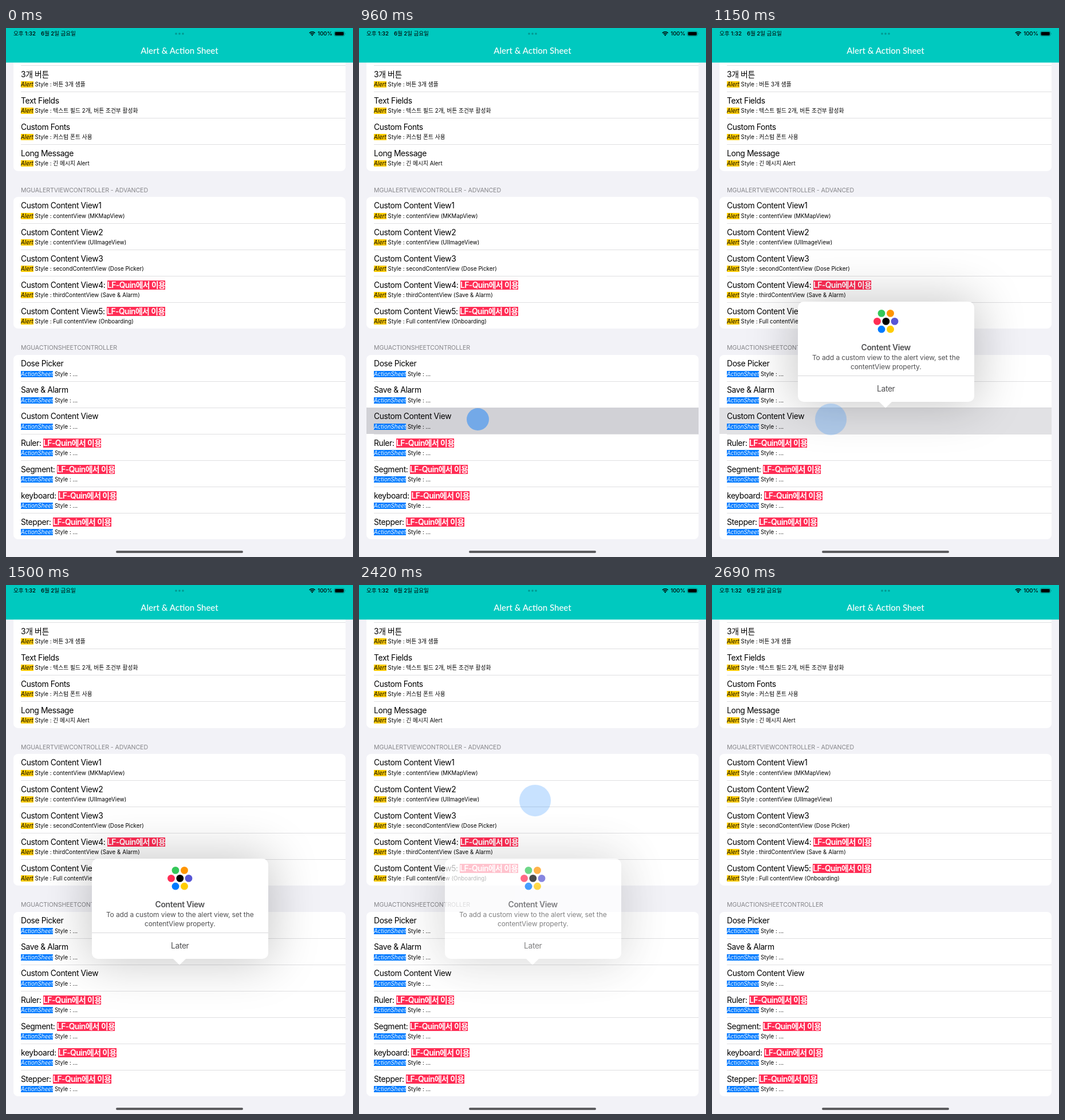
An HTML page that plays this animation: 606 by 924 pixels, repeating every 2.88 s.

```html
<!DOCTYPE html>
<html lang="ko">
<head>
<meta charset="utf-8">
<title>Alert &amp; Action Sheet</title>
<style>
  html, body { margin: 0; width: 100%; height: 100%; overflow: hidden; }
  body {
    position: relative;
    background: #f2f2f7;
    color: #000;
    font-family: Inter, "Noto Sans CJK KR", "Noto Sans CJK", sans-serif;
    white-space: nowrap;
  }
  .abs, .card, .row::after, .tap, .popup, .popup > * { position: absolute; }

  /* navigation bar */
  .nav { left: 0; top: 0; width: 100%; height: 60px; background: #00c9bf; box-shadow: 0 1px #00c9bf66; }
  .status { top: 3px; font-size: 9.6px; line-height: 14px; font-weight: 500; letter-spacing: -.04px; }
  .heading {
    left: 0; right: 0; top: 29px; text-align: center; color: #fff;
    font: 500 15px/20px Lato, sans-serif;
  }
  .nav svg { position: absolute; left: 0; top: 0; }

  /* list */
  .card { left: 13px; width: 580px; background: #fff; border-radius: 8px; overflow: hidden; }
  .row { position: relative; height: 46.05px; padding-left: 13px; }
  .row::after { content: ""; left: 13px; right: 0; bottom: -.5px; height: 1px; background: #dfdfe1; }
  .row:last-child::after { display: none; }
  .name { padding-top: 5.3px; font-size: 13.85px; line-height: 20px; letter-spacing: -.36px; }
  .sub { margin-top: 1.4px; font-size: 9.7px; line-height: 14px; letter-spacing: .05px; }
  .badge { background: #ff2d55; color: #fff; font-weight: 600; letter-spacing: -.57px; }
  .kind { font-style: italic; }
  .alert { background: #fc0; }
  .sheet { background: #007aff; color: #fff; }
  .section { left: 26px; font-size: 10.6px; line-height: 14px; letter-spacing: -.1px; color: #858589; }
  .home { left: 192px; top: 913.4px; width: 222px; height: 4.1px; border-radius: 3px; background: #5b5b5e; }

  /* popover */
  .popup {
    left: 150px; top: 478px; width: 307.5px; height: 174.7px;
    border-radius: 10px; background: #fff; color: #505052;
    box-shadow: 0 0 84px 6px rgba(0, 0, 0, .22);
    text-align: center;
    opacity: 0;
    animation: popup 2880ms linear infinite;
  }
  .popup > div { left: 0; right: 0; }
  .popup .arrow {
    left: 141px; right: auto; top: 174px; width: 24px; height: 11.5px; background: #fff;
    clip-path: polygon(0 0, 100% 0, 55% 92%, 50% 100%, 45% 92%);
  }
  .popup .head { top: 70px; font-size: 13.85px; line-height: 20px; font-weight: 600; letter-spacing: -.32px; }
  .popup .note { top: 89.5px; font-size: 12px; line-height: 16.4px; letter-spacing: -.1px; }
  .popup .line { top: 128.5px; height: 1px; background: #d8d8da; }
  .popup .later { top: 142px; font-size: 13.85px; line-height: 20px; letter-spacing: -.4px; }
  .popup svg { left: 0; top: 0; }

  /* touches */
  .tap {
    width: 39px; height: 39px; margin: -19.5px; border-radius: 50%;
    background: #007aff; opacity: 0;
    animation: tap 2880ms linear infinite;
  }
  .pressed { animation: press 2880ms linear infinite; }

  @keyframes tap {
    0%, 2.083% { opacity: .45; transform: scale(1); }
    13.889%, 100% { opacity: 0; transform: scale(1.8); }
  }
  @keyframes press {
    0%, 33.1% { background-color: #d1d1d600; }
    33.101%, 34.9% { background-color: #d1d1d6; }
    49.3%, 100% { background-color: #d1d1d600; }
  }
  @keyframes popup {
    0%, 34.4% { opacity: 0; }
    34.401% { opacity: 1; }
    78.819% { opacity: 1; animation-timing-function: ease-in-out; }
    93.056%, 100% { opacity: 0; }
  }
</style>
</head>
<body>
  <div id="list"></div>
  <div class="abs section" style="top:276.5px">MGUALERTVIEWCONTROLLER - ADVANCED</div>
  <div class="abs section" style="top:552px">MGUACTIONSHEETCONTROLLER</div>

  <div class="abs nav">
    <div class="abs status" style="left:13px">오후 1:32</div>
    <div class="abs status" style="left:61px">6월 2일 금요일</div>
    <div class="abs status" style="right:36px">100%</div>
    <div class="abs heading">Alert &amp; Action Sheet</div>
    <svg width="606" height="60" fill="none">
      <g fill="#00978f">
        <circle cx="297" cy="10" r="1.8"/><circle cx="303" cy="10" r="1.8"/><circle cx="309" cy="10" r="1.8"/>
      </g>
      <g stroke="#000" stroke-width="1.5">
        <path d="M529.8 8.7a7 7 0 0 1 9.9 0M531.7 10.7a4.3 4.3 0 0 1 6.1 0"/>
      </g>
      <path d="M533 12a2.5 2.5 0 0 1 3.5 0l-1.75 1.9z" fill="#000"/>
      <rect x="573.4" y="5.9" width="17.6" height="8.2" rx="2.5" stroke="#00756f" stroke-width=".8"/>
      <rect x="574.6" y="7.1" width="15.2" height="5.8" rx="1.4" fill="#000"/>
      <path d="M592 8.7q1.2 1.3 0 2.6z" fill="#00756f"/>
    </svg>
  </div>

  <div class="abs home"></div>

  <div class="popup">
    <svg width="307" height="70" id="dots"></svg>
    <div class="head">Content View</div>
    <div class="note">To add a custom view to the alert view, set the<br>contentView property.</div>
    <div class="line"></div>
    <div class="later">Later</div>
    <div class="arrow"></div>
  </div>

  <div class="tap" style="left:207.5px;top:683.5px;animation-delay:915ms"></div>
  <div class="tap" style="left:307.5px;top:376.5px;animation-delay:2185ms"></div>

<script>
  const BADGE = '<span class="badge">LF-Quin에서 이용</span>';
  const alertKind = '<span class="kind alert">Alert</span>';
  const sheetKind = '<span class="kind sheet">ActionSheet</span>';

  const cards = [
    { top: 19.3, kind: alertKind, rows: [
      ['', ''],
      ['3개 버튼', '버튼 3개 샘플'],
      ['Text Fields', '텍스트 필드 2개, 버튼 조건부 활성화'],
      ['Custom Fonts', '커스텀 폰트 사용'],
      ['Long Message', '긴 메시지 Alert'],
    ] },
    { top: 295.2, kind: alertKind, rows: [
      ['Custom Content View1', 'contentView (MKMapView)'],
      ['Custom Content View2', 'contentView (UIImageView)'],
      ['Custom Content View3', 'secondContentView (Dose Picker)'],
      ['Custom Content View4: ' + BADGE, 'thirdContentView (Save &amp; Alarm)'],
      ['Custom Content View5: ' + BADGE, 'Full contentView (Onboarding)'],
    ] },
    { top: 571.1, kind: sheetKind, pressed: 2, rows: [
      'Dose Picker', 'Save &amp; Alarm', 'Custom Content View',
      'Ruler: ' + BADGE, 'Segment: ' + BADGE, 'keyboard: ' + BADGE, 'Stepper: ' + BADGE,
    ].map(name => [name, '...']) },
  ];

  const rowHtml = (kind, [name, text], pressed) =>
    `<div class="row${pressed ? ' pressed' : ''}">` +
    `<div class="name">${name}</div><div class="sub">${text && `${kind} Style : ${text}`}</div></div>`;

  document.getElementById('list').innerHTML = cards.map(({ top, kind, rows, pressed }) =>
    `<div class="card" style="top:${top}px">` +
    rows.map((row, i) => rowHtml(kind, row, i === pressed)).join('') + '</div>').join('');

  const dots = [
    [146, 20.4, '#34c759'], [161.5, 20.4, '#ff9500'],
    [138.5, 34.4, '#ff2d55'], [153.8, 34.4, '#000'], [169, 34.4, '#5856d6'],
    [146, 48.2, '#007aff'], [161.5, 48.2, '#fc0'],
  ];
  document.getElementById('dots').innerHTML = dots.map(([x, y, fill]) =>
    `<circle cx="${x}" cy="${y}" r="6.4" fill="${fill}"/>`).join('');
</script>
</body>
</html>
```
